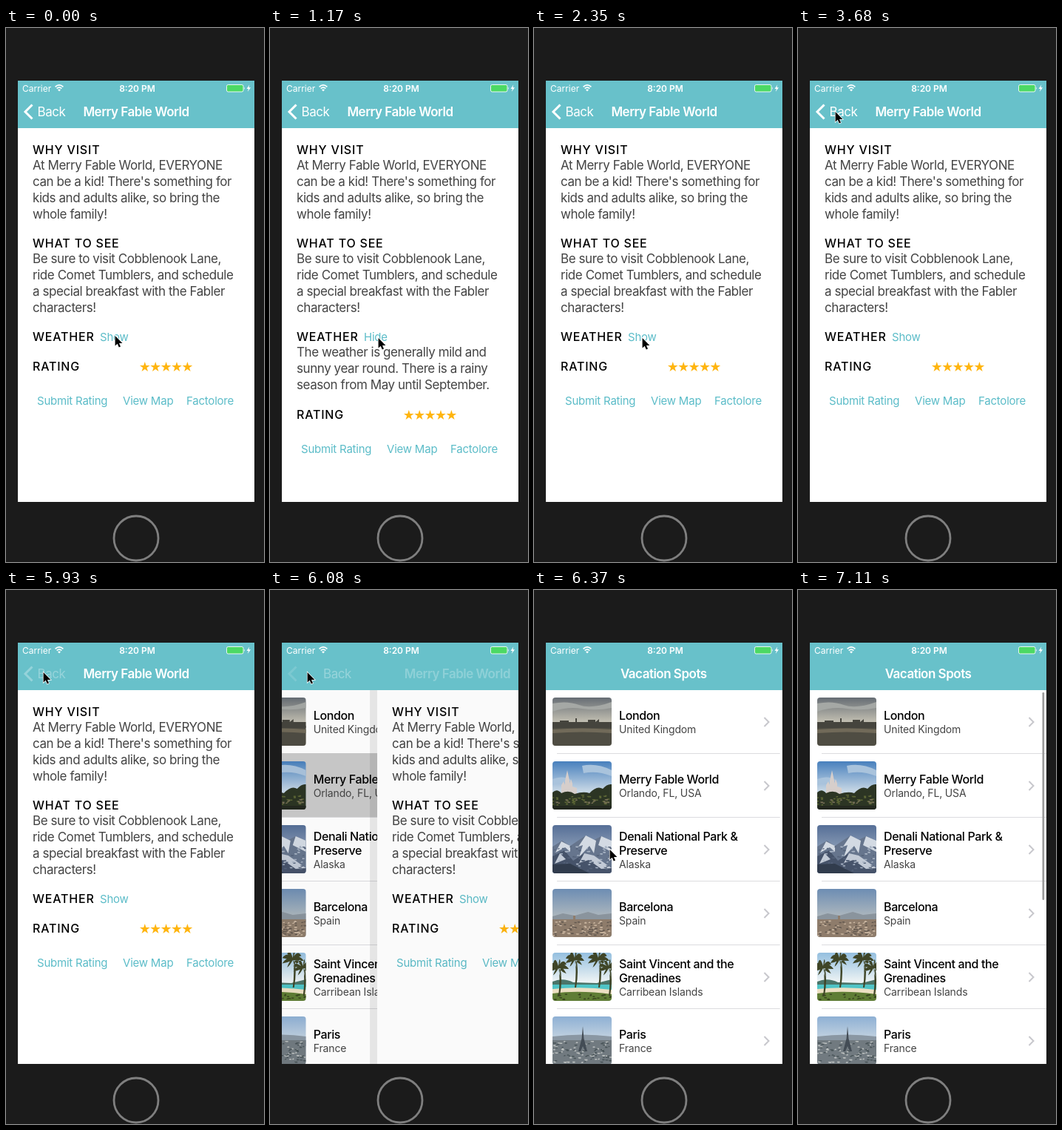
An HTML page for the animation above (7.26 s loop, 349x720 px).

```html
<!DOCTYPE html>
<html lang="en">
<head>
<meta charset="utf-8">
<title>Vacation Spots</title>
<style>
  html, body { margin: 0; width: 100%; height: 100%; overflow: hidden; background: #1b1b1b; }
  svg { display: block; width: 100%; height: 100%; }
  text { font-family: Inter, sans-serif; }
  .status { font-size: 12px; fill: #fff; }
  .title { font-size: 17px; font-weight: 600; letter-spacing: -.5px; text-anchor: middle; fill: #fff; }
  .back { font-size: 17px; letter-spacing: -.43px; fill: #fff; }
  .head { font-size: 16px; font-weight: 500; letter-spacing: .8px; fill: #000; }
  .body { font-size: 17px; letter-spacing: -.43px; fill: #444; }
  .link { font-size: 15px; letter-spacing: -.22px; fill: #5bbcc8; }
  .name { font-size: 16px; font-weight: 550; letter-spacing: -.37px; fill: #000; }
  .place { font-size: 14px; letter-spacing: -.15px; fill: #444; }
  .line { fill: none; stroke: #fff; }
</style>
</head>
<body>
<svg viewBox="0 0 349 720">
  <defs>
    <clipPath id="screen"><path d="M16 71H336V639H16Z"/></clipPath>
    <clipPath id="photo"><rect width="80" height="65" rx="4"/></clipPath>
    <clipPath id="reveal"><rect id="revealBox" x="36" y="427" width="290" height="0"/></clipPath>
  </defs>
  <rect width="349" height="720" fill="#1b1b1b"/>
  <circle cx="176" cy="688" r="30" fill="none" stroke="#7f7f7f" stroke-width="2.8"/>
  <g clip-path="url(#screen)">
    <rect x="16" y="71" width="320" height="568" fill="#fff"/>
    <g id="list"></g>
    <g id="detail"></g>
    <rect id="dim" x="16" y="135" width="320" height="504" opacity=".02"/>
    <rect id="scrollbar" x="330.5" y="138" width="2.6" height="280" rx="1.3" fill="#999"/>
    <rect x="16" y="71" width="320" height="64" fill="#68c1ca"/>
    <text id="listTitle" class="title" x="176" y="119">Vacation Spots</text>
    <text id="detailTitle" class="title" x="176" y="119">Merry Fable World</text>
    <text id="back" class="back" x="42.5" y="119">Back</text>
    <path id="arrow" class="line" stroke-width="3" d="M35.5 103.5L26 113L35.5 122.5"/>
    <text class="status" x="22" y="85.5">Carrier</text>
    <text class="status" x="177.5" y="85.5" text-anchor="middle" font-weight="600">8:20 PM</text>
    <path class="line" stroke-width="1.7" d="M66.6 79.3Q72 74.3 77.4 79.3M68.7 81.7Q72 78.6 75.3 81.7"/>
    <path fill="#fff" d="M70 83.3Q72 81.6 74 83.3L72 85.5Z"/>
    <rect x="298.5" y="76.5" width="22.5" height="9.5" rx="2" fill="#4cd964" stroke="#fff" stroke-opacity=".85"/>
    <path fill="#fff" d="M322 79.5q1.6 1.7 0 3.6zM329.3 76.5L325.6 82H328L326.8 86L331 80.3H328.4Z"/>
  </g>
  <path id="cursor" d="M.6 1V14.6L3.7 11.8L5.8 16.6L8 15.6L6 11H10.4Z" stroke="#fff" stroke-width="1.4" paint-order="stroke"/>
</svg>
<script>
const LOOP = 7260;
const $ = id => document.getElementById(id);
const clamp = v => Math.min(1, Math.max(0, v));
const ease = v => { v = clamp(v); return v * v * (3 - 2 * v); };

const text = (cls, x, y, ...lines) =>
  lines.map((s, i) => `<text class="${cls}" x="${x}" y="${y + i * (cls === 'name' ? 19 : 22)}">${s}</text>`).join('');

let seed = 7;
const random = () => (seed = seed * 16807 % 2147483647) / 2147483647;

// Small scattered patches for roofs, leaves and rock
const specks = (color, top, bottom, count) => [color, Array.from({ length: count }, () =>
  `M${(random() * 78).toFixed(1)} ${(top + random() * (bottom - top)).toFixed(1)}h${(1 + random() * 4).toFixed(1)}v1.6h-3z`).join('')];

const palm = (x, y, size) => {
  const fronds = Array.from({ length: 9 }, (_, i) => {
    const a = i * .7, dx = Math.cos(a) * size, dy = Math.sin(a) * size * .7;
    return `M${x} ${y}q${dx * .6} ${dy - 5} ${dx} ${dy + 4}q${-dx * .5} ${-dy * .3} ${-dx} ${-dy - 1}z`;
  });
  return `M${x} ${y}q3 18 0 40h2q4-22 0-40z` + fronds.join('');
};

const spots = [
  { name: ['London'], place: 'United Kingdom', sky: ['#666d74', '#d3cebd'], shapes: [
    ['#a5a8a5', 'M0 8Q20 4 36 10T80 6V14Q60 18 40 15T0 19Z'],
    ['#4f4d43', 'M0 38H80V65H0Z'],
    ['#45443d', 'M0 33H10V31H22V33H31V28H33V33H48V30H58V33L63 29V33H80V41H0Z'],
    ['#716a59', 'M0 43Q40 40 80 43V48Q40 45 0 48Z']] },
  { name: ['Merry Fable World'], place: 'Orlando, FL, USA', sky: ['#4880bd', '#c4d5e4'], shapes: [
    ['#a9c3dc', 'M40 6Q60 2 80 12V20Q60 12 42 16ZM0 24Q15 18 26 26L0 32Z'],
    ['#d6cecb', 'M12 46V32L15 27L17 32V26L20 12L23 26V30L25 24L27 30V34L33 36V46Z'],
    ['#2c3524', 'M0 42Q6 36 12 43Q22 38 30 44Q42 40 50 43Q60 32 68 37Q74 30 80 31V65H0Z'],
    specks('#5c6635', 45, 58, 40), specks('#7a715a', 50, 56, 15),
    ['#23281f', 'M0 60H80V65H0Z']] },
  { name: ['Denali National Park &amp;', 'Preserve'], place: 'Alaska', sky: ['#566f97', '#93a4bb'], shapes: [
    ['#66758d', 'M0 29L13 21L24 28L45 14L56 20L66 15L80 21V65H0Z'],
    ['#d3dae3', 'M45 14L35 29L41 27L36 43L50 28L56 38L59 21ZM66 15L62 27L80 36V21ZM12 22L4 37L17 30L24 36L24 28Z'],
    ['#46536a', 'M0 42L16 34L28 48L43 38L80 58V65H0Z'],
    ['#c2cad6', 'M43 38L36 51L49 47L66 59L80 58L56 41ZM10 38L3 52L18 46Z'],
    specks('#55637a', 28, 62, 40), specks('#a9b5c5', 28, 58, 25),
    ['#313c4d', 'M0 53L24 52L50 65H0Z']] },
  { name: ['Barcelona'], place: 'Spain', sky: ['#6d8db3', '#b0b9be'], shapes: [
    ['#8a949d', 'M0 37L14 33L30 36L48 31L62 35L80 33V45H0Z'],
    ['#8e7c6b', 'M0 41H28V36H31V41H80V65H0Z'],
    specks('#c9b5a0', 42, 62, 50), specks('#63584f', 43, 62, 45)] },
  { name: ['Saint Vincent and the', 'Grenadines'], place: 'Carribean Islands', sky: ['#94bfdf', '#edf3f4'], shapes: [
    ['#4a7569', 'M0 39Q14 33 28 40L60 41L80 36V46H0Z'],
    ['#4fc4c6', 'M0 43H80V50H0Z'],
    ['#ece0c3', 'M0 49Q40 45 80 50V58H0Z'],
    ['#5f7d35', 'M0 55Q35 50 80 56V65H0Z'],
    specks('#39471f', 55, 63, 25),
    ['#3f4527', palm(8, 18, 14) + palm(30, 7, 13) + palm(62, 7, 15) + palm(76, 18, 14)]] },
  { name: ['Paris'], place: 'France', sky: ['#8eb0d4', '#d3dde4'], shapes: [
    ['#8a97a3', 'M0 27Q40 22 80 27V40H0Z'],
    ['#717a80', 'M0 32H80V65H0Z'],
    specks('#bcc0bf', 32, 62, 50), specks('#4a5559', 34, 62, 50),
    ['#434c55', 'M41 13L42.5 30L47 47H44L41 40L38 47H35L39.5 30Z']] }
];

const cell = ({ name, place, sky, shapes }, i) => {
  const top = 135 + 86 * i, first = top + (name.length > 1 ? 31 : 40);
  return `<linearGradient id="sky${i}" x2="0" y2="1"><stop stop-color="${sky[0]}"/><stop offset=".6" stop-color="${sky[1]}"/></linearGradient>
    ${i === 1 ? `<rect id="selected" x="16" y="${top - 1}" width="320" height="87" fill="#cacaca"/>` : ''}
    <g transform="translate(26 ${top + 10})" clip-path="url(#photo)">
      <rect width="80" height="65" fill="url(#sky${i})"/>
      ${shapes.map(([fill, d]) => `<path fill="${fill}" d="${d}"/>`).join('')}
    </g>
    ${text('name', 116, first, ...name)}
    ${text('place', 116, first + 19 * name.length - 1, place)}
    <path class="line" style="stroke:#c7c7cc" stroke-width="2" d="M312.5 ${top + 37}l6 6l-6 6"/>
    <rect x="32" y="${top + 85}" width="304" height="1" fill="#dcdcdf"/>`;
};
$('list').innerHTML = spots.map(cell).join('');

const star = (_, n) => 'M' + Array.from({ length: 10 }, (_, k) => {
  const r = k % 2 ? 2.8 : 7.2, a = k * Math.PI / 5;
  return `${(187.8 + 14.4 * n + r * Math.sin(a)).toFixed(2)} ${(457.2 - r * Math.cos(a)).toFixed(2)}`;
}).join('L') + 'Z';

$('detail').innerHTML = `
  <rect id="edge" x="6" y="135" width="10" height="504"/>
  <rect x="16" y="135" width="320" height="504" fill="#fff"/>
  ${text('head', 36, 170, 'WHY VISIT')}
  ${text('body', 36, 191, 'At Merry Fable World, EVERYONE', "can be a kid! There's something for",
    'kids and adults alike, so bring the', 'whole family!')}
  ${text('head', 36, 296, 'WHAT TO SEE')}
  ${text('body', 36, 317, 'Be sure to visit Cobblenook Lane,', 'ride Comet Tumblers, and schedule',
    'a special breakfast with the Fabler', 'characters!')}
  ${text('head', 36, 422, 'WEATHER')}
  <text id="toggle" class="link" x="127" y="422"></text>
  <g id="weather" clip-path="url(#reveal)">
    ${text('body', 36, 443, 'The weather is generally mild and', 'sunny year round. There is a rainy',
      'season from May until September.')}
  </g>
  <g id="lower">
    ${text('head', 36, 462, 'RATING')}
    <path fill="#ffb50f" d="${Array.from({ length: 5 }, star).join('')}"/>
    ${text('link', 42, 507.5, 'Submit Rating')}
    ${text('link', 158, 507.5, 'View Map')}
    ${text('link', 244, 507.5, 'Factolore')}
  </g>`;

const ticks = [0, 140, 290, 440, 590, 740, 880, 1170, 1770, 1920, 2060, 2210, 2350, 2950, 3090, 3240, 3390,
  3530, 3680, 4580, 5930, 6080, 6220, 6370, 6520, 6670, 6820, 6970, 7110];

// time, x, y of the pointer tip
const pointer = [[0, 147, 414], [880, 144, 416], [1170, 146, 417], [2800, 146, 417], [3530, 45, 96], [3680, 50, 112],
  [4580, 50, 110], [6080, 50, 110], [6370, 102, 349], [6670, 215, 560], [6970, 288, 689], [LOOP, 288, 689]];

function pointerAt(t) {
  const i = pointer.findIndex(p => p[0] > t);
  const [t0, x0, y0] = pointer[i - 1], [t1, x1, y1] = pointer[i];
  const f = (t - t0) / (t1 - t0);
  return [x0 + (x1 - x0) * f, y0 + (y1 - y0) * f];
}

// Critically damped spring of the page change
function popProgress(t) {
  const s = Math.max(0, t - 6003) * .018;
  return 1 - (1 + s) * Math.exp(-s);
}

const move = (id, x, y = 0) => $(id).setAttribute('transform', `translate(${x} ${y})`);
const fade = (id, v) => $(id).setAttribute('opacity', clamp(v));

function render(t) {
  const open = ease((t - 290) / 400) - ease((t - 1850) / 400);
  $('revealBox').setAttribute('height', 65 * open);
  fade('weather', open);
  move('lower', 0, 65 * open);
  $('toggle').textContent = t >= 290 && t < 1920 ? 'Hide' : 'Show';
  fade('toggle', (t >= 140 && t < 290) || (t >= 1770 && t < 1920) ? .3 : 1);

  const p = popProgress(t);
  const pressed = t >= 5930 && t < 6080;
  move('list', -96 * (1 - p));
  move('detail', 320 * p);
  fade('edge', p < .95 ? .135 * (1 - p) : 0);
  fade('selected', (.95 - p) * 2);
  fade('dim', p > 0 && p < .95 ? .02 : 0);
  move('back', 73 * p);
  fade('back', pressed ? .3 : 1 - 1.7 * p);
  fade('arrow', pressed ? .3 : 1 - 2.15 * p);
  move('detailTitle', 192 * p);
  fade('detailTitle', 1 - 1.85 * p);
  move('listTitle', -73 * (1 - p));
  fade('listTitle', (p - .5) * 2.1);
  fade('scrollbar', (t - 6500) / 150);

  move('cursor', ...pointerAt(t));
  fade('cursor', t < 7110 ? 1 : 0);
}

function loop(now) {
  const t = now % LOOP;
  render(ticks.filter(tick => tick <= t).pop() ?? 0);
  requestAnimationFrame(loop);
}
render(0);
requestAnimationFrame(loop);
</script>
</body>
</html>
```
